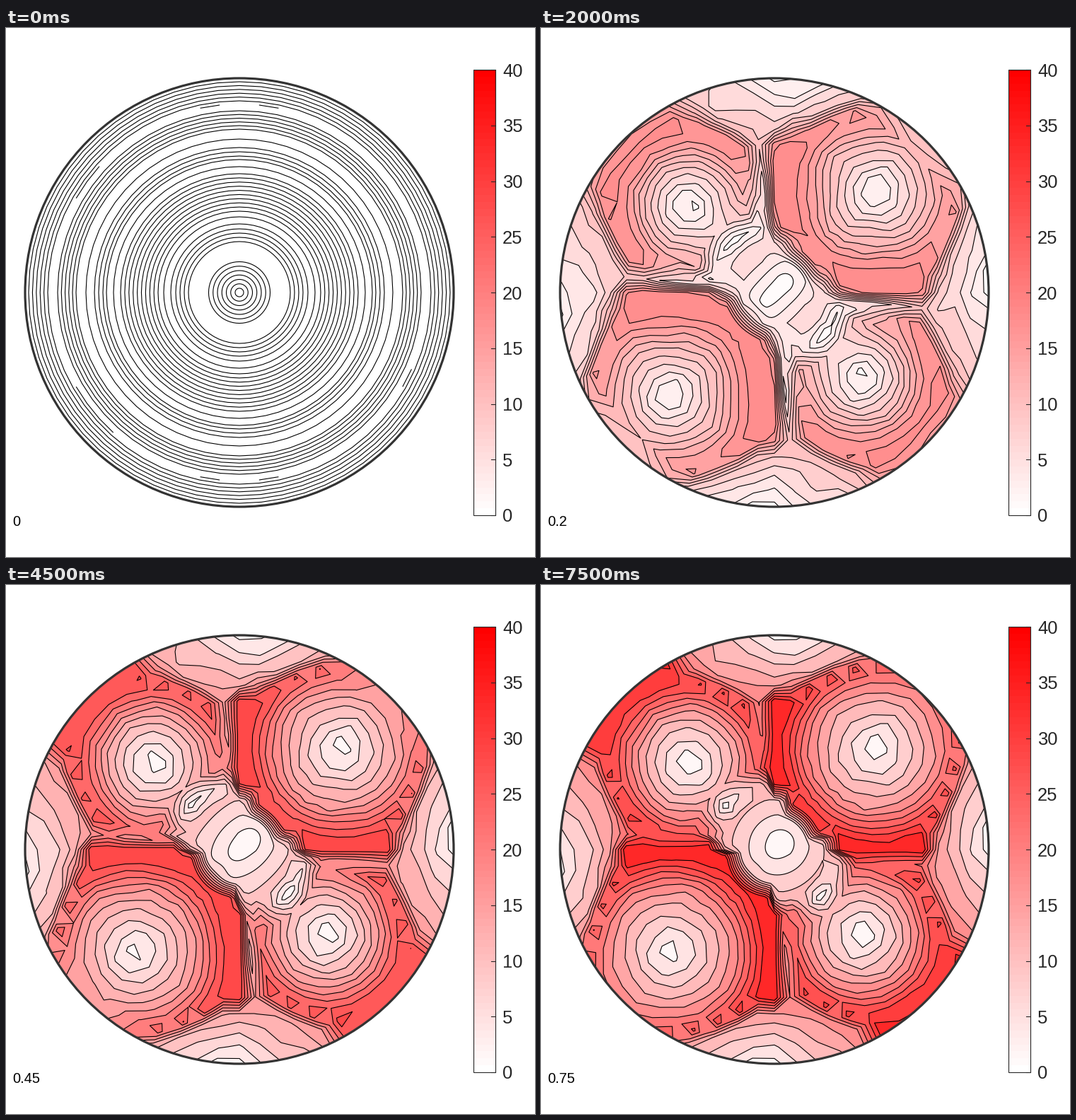
Write a matplotlib script that moves like this. It is 748 by 748 pixels and loops after 8000 ms.

```python
import numpy as np
import matplotlib.pyplot as plt
from matplotlib.animation import FuncAnimation
from matplotlib.colors import LinearSegmentedColormap
from matplotlib.patches import Circle, Rectangle

SIZE, DPI = 748, 100
CX, CY, R = 330, 374, 303
BANDS = 11
INK = "#262626"
reds = LinearSegmentedColormap.from_list("reds", ["white", "red"], N=64)

plt.rcParams["font.family"] = "Liberation Sans"
fig = plt.figure(figsize=(SIZE / DPI, SIZE / DPI), dpi=DPI, facecolor="white")
ax = fig.add_axes([0, 0, 1, 1])


def px(n):
    return n * 72 / DPI


# polar mesh: 13 radial steps, 6 degrees per sector
rad, ang = np.meshgrid(np.linspace(0, R, 14), np.radians(np.arange(0, 361, 6)),
                       indexing="ij")
X, Y = CX + rad * np.cos(ang), CY - rad * np.sin(ang)
rng = np.random.default_rng(4)
rough = rng.normal(size=rad.shape)
rough[:, -1] = rough[:, 0]
rough[rad < 90] = 0

# x, y, power weight, strong diagonal
CORNERS = [(208, 250, 0, False), (473, 232, 14800, True),
           (453, 495, 0, False), (184, 518, 14800, True)]
CORE = (337, 367)
EDGES = [(0.05, -1), (1, -0.05), (-0.05, 1), (-1, 0.05)]


def soften(u, v, cap):
    m = np.hypot(u, v) + 1e-9
    k = cap * np.tanh(m / cap) / m
    return u * k, v * k


def saddle(dx, dy, n, s_in, s_out):
    """Flow towards the origin along n and away from it across n."""
    p, q = dx * n[0] + dy * n[1], dy * n[0] - dx * n[1]
    a, b = -p / s_in, q / s_out
    return a * n[0] - b * n[1], a * n[1] + b * n[0]


def speed(t):
    """Speed at the mesh nodes, counted in colour bands."""
    temp = 500 + 3600 * np.exp(-t / 0.2)
    scale = 19 - 13 * np.exp(-t / 0.35)
    young = np.exp(-t / 0.25)
    wall = np.ones_like(rad)
    wall[-1] -= 0.75 * np.exp(-t / 0.35)

    phi, flow = [], []
    for x, y, w, strong in CORNERS:
        dx, dy = X - x, Y - y
        d = np.hypot(dx, dy)
        a = np.arctan2(dy, dx) - np.arctan2(CY - y, CX - x)
        if strong:
            lean = 1 + 0.4 * young * np.sin(2 * a) ** 2 * (1 + np.cos(a)) / 2
            lean *= 1 + 0.4 * np.minimum(d / 130, 1) ** 4
        else:
            lean = 1 - 0.12 * young * np.cos(a) * np.minimum(d / 80, 1)
            lean *= 1 + 0.45 * np.minimum(d / 100, 1) ** 2
        k = lean * wall / scale
        phi.append(d ** 2 - w)
        flow.append(soften(dx * k, dy * k, 8.5 + 18 * t))

    dx, dy = X - CORE[0], Y - CORE[1]
    h = np.sqrt(0.5)
    phi.append(dx ** 2 + dy ** 2 + (dx - dy) ** 2 - 3100)
    flow.append(soften(*saddle(dx, dy, (h, -h), 19 + 50 * young, 21 - 18 * young), 7))

    tight = 1 - 0.4 * young
    for n in EDGES:
        vx, vy = CX + 414 * n[0], CY + 414 * n[1]
        phi.append((X - vx) ** 2 + (Y - vy) ** 2 - 27150)
        u = saddle(X - CX - 306 * n[0], Y - CY - 306 * n[1], n,
                   14 * tight, 25 * tight)
        flow.append(soften(*u, 4.2 + 5 * t))

    phi = np.array(phi)
    w = np.exp(-(phi - phi.min(axis=0)) / (2 * temp))
    w /= w.sum(axis=0)
    u, v = (w[:, None] * np.array(flow)).sum(axis=0)
    s = np.hypot(u, v)
    s += rough * (0.14 + 0.5 * young * w[5:].sum(axis=0))
    s = np.where(s > 6, 6 + 5 * np.tanh((s - 6) / 5), s)
    top = s.max()
    if top > 7:
        s = np.where(s > 6, 6 + (s - 6) * (BANDS - 6) / (top - 6), s)
    return np.clip(s, 0.02, BANDS - 0.01)


def rings():
    """Contours of the fluid at rest."""
    spans = [(6, 43.5, 7), (72, 90, 4), (97, 107, 2), (115, 168, 10),
             (178, 188, 2), (193, 205, 3), (217, 231, 2), (236, 257, 5),
             (271, 298, 6)]
    unit = np.radians(np.arange(0, 361, 6))
    out = [(r, unit) for a, b, n in spans for r in np.linspace(a, b, n)]
    for a, b in [(78, 84), (96, 102), (258, 264), (276, 282),
                 (138, 150), (210, 228), (330, 336)]:
        out.append((266.5, np.radians(np.arange(a, b + 1, 6))))
    return [ax.plot(CX + r * np.cos(a), CY - r * np.sin(a), color="black",
                    lw=px(1.1), solid_capstyle="butt")[0] for r, a in out]


def colorbar():
    left, right, top, bottom = 661, 692.5, 59, 689
    ax.imshow(np.linspace(1, 0, 256)[:, None], cmap=reds, aspect="auto",
              extent=(left, right, bottom, top), interpolation="nearest")
    ax.add_patch(Rectangle((left, top), right - left, bottom - top, fill=False,
                           ec=INK, lw=px(1.1), zorder=4))
    for v in range(0, 41, 5):
        y = bottom - (bottom - top) * v / 40
        ax.plot([right - 6, right], [y, y], color=INK, lw=px(1.1), zorder=4)
        ax.text(702, y + 9.5, str(v), size=px(25.5), color=INK, va="baseline")


colorbar()
ax.add_patch(Circle((CX, CY), R, fill=False, ec="#333333", lw=px(3.2), zorder=5))
clock = ax.text(9, 704, "", size=px(20), color="black", va="baseline")
ax.set(xlim=(0, SIZE), ylim=(SIZE, 0), aspect="auto")
ax.axis("off")
shown = []


def draw(i):
    while shown:
        shown.pop().remove()
    t = i * 0.05
    clock.set_text(f"{t:.3g}")
    if i == 0:
        shown.extend(rings())
        return [clock]
    peak = 38 * (1 - np.exp(-t / 0.29))
    levels = np.arange(BANDS + 1)
    colors = reds(peak * (levels[:-1] + 0.5) / BANDS / 40)
    s = speed(t)
    shown.append(ax.contourf(X, Y, s, levels=levels, colors=colors, zorder=1))
    shown.append(ax.contour(X, Y, s, levels=levels[1:-1], colors="black",
                            linewidths=px(1.1), zorder=2))
    return [clock]


anim = FuncAnimation(fig, draw, frames=16, interval=500, repeat=True,
                     repeat_delay=0, init_func=lambda: draw(0), blit=False)
plt.show()
```
